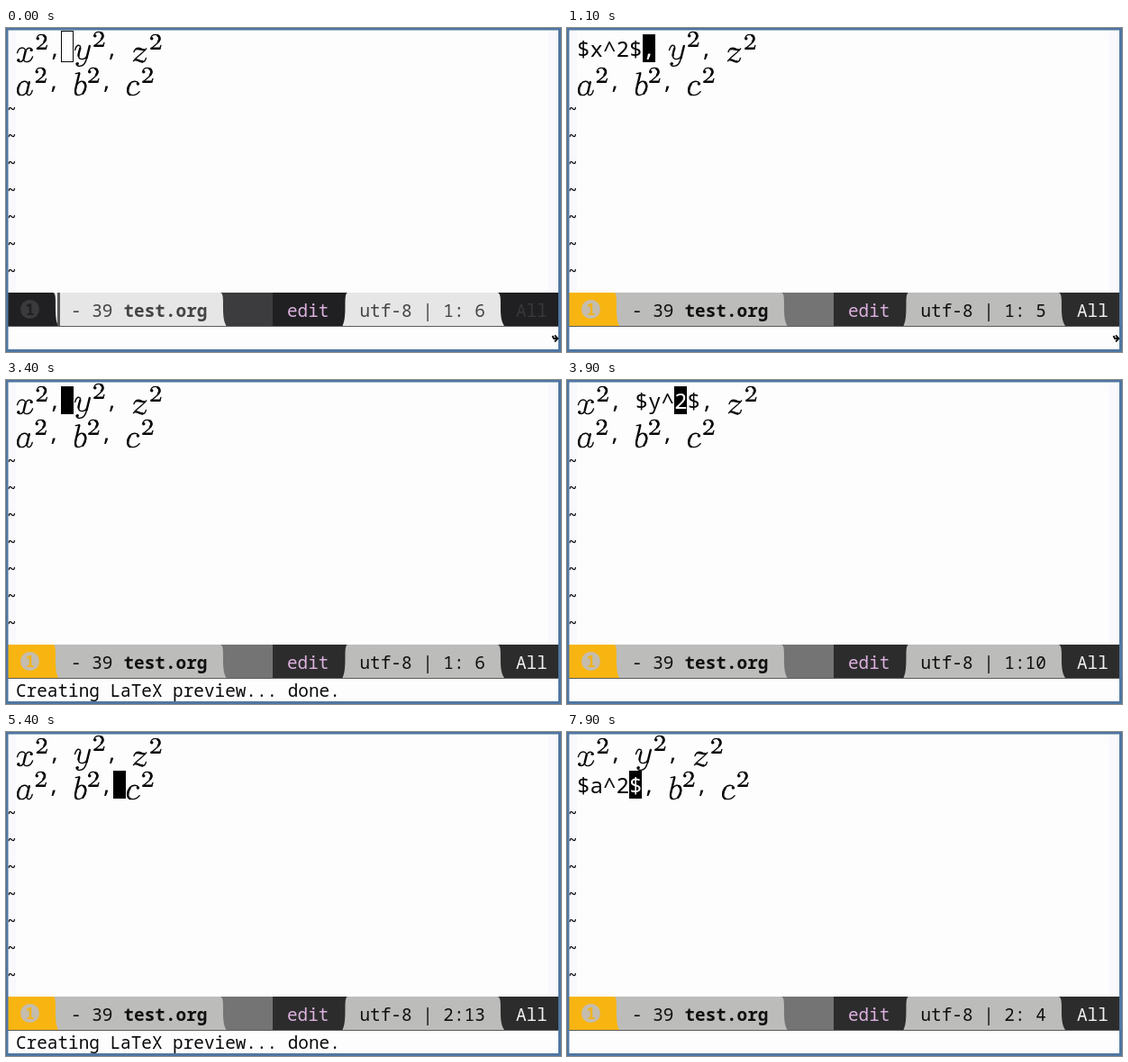
Animation, 616 px wide and 360 px high, one loop 8000 ms. Source, as an HTML page with a canvas:

```html
<!DOCTYPE html>
<html lang="en">
<head>
<meta charset="utf-8">
<title>Formula preview in an editor</title>
<style>
html, body { margin: 0; width: 616px; height: 360px; overflow: hidden; background: #fdfdfd; }
canvas { display: block; }
</style>
</head>
<body>
<canvas id="stage" width="616" height="360"></canvas>
<script>
const ctx = document.getElementById('stage').getContext('2d');
const LOOP = 8000, FOCUS = 500, ARROW_GONE = 2300;
const MONO = '"Noto Sans Mono", "DejaVu Sans Mono", monospace';
const CELL = 14.5, LEFT = 11;
const INK = '#080808', PAPER = '#fdfdfd';

// Math glyphs: preview width, lift, thin strokes, thick strokes, ball ends.
const glyphs = {
  x: {
    w: 35.5,
    thin: 'M1.5-10.5C2.5-14 4.5-16 7-16C9.5-16 11-14 10.5-11.5M8.8-4.5C8-1.5 6.5-.5 4.5-.5C3.2-.5 2.5-1 2.2-1.6' +
      'M10.6-11.5C11.5-14.5 13-15.7 15-15.7C16.3-15.7 17-15.3 17.3-14.6M8.8-4.5C8.3-2 9.5-.4 12-.4C15-.4 17.5-3 18.5-6',
    thick: 'M10.6-12L8.8-4.5',
    balls: [[2.8, -2.2], [17.2, -13.6]]
  },
  y: {
    w: 34.5,
    lift: 3,
    thin: 'M1-10.5C2-14 3.3-15.8 5-15.8C7-15.8 7.4-14 6.8-12M5-4.5C5-1.5 6.5-.4 9-.4C11.5-.4 13.3-2 14.5-4' +
      'M14-1.5C12.8 4 9.8 7.4 6.2 7.4C4 7.4 2.5 6.2 2.6 4.8',
    thick: 'M6.8-12.3C5.8-9 5-6.5 5-4.2M17.3-15L14-1.5',
    balls: [[3.8, 4.6]]
  },
  z: {
    w: 34,
    thin: 'M3-11.5C4-14.5 5.5-15.8 8-15.8C11-15.8 12-13.5 14.5-13.5C15.8-13.5 16.5-14.5 17-15.5C14-10.5 6-6.5 2.2-.8' +
      'C3.5-3.2 5.5-3.2 7.5-2.3C10-1 10.5-.3 12.5-.3C14.5-.3 15.8-2 16.4-4.6',
    thick: 'M6-14.8C9.5-15.5 11-13.4 14.5-13.6M5-2.6C8-2.8 9.5-.6 12.5-.7',
    balls: []
  },
  a: {
    w: 34.5,
    thin: 'M13.5-12.5C13-14.8 11.5-15.8 9.8-15.8C5.5-15.8 1.8-10.8 1.8-5.8C1.8-2.3 3.8-.4 6.5-.4C8.8-.4 11-2.2 12.2-4.2' +
      'M12.3-4C11.8-1.6 12.8-.4 14.3-.4C16.3-.4 17.5-2.6 18.2-5.6',
    thick: 'M4.2-12.4C2.6-9.8 2-7.6 2.2-5C2.3-2.8 3-1.6 4-1M14.8-14.8L12.3-4',
    balls: []
  },
  b: {
    w: 29.5,
    thin: 'M2.8-24.4L7-25M3-8.5C2-4 2.5-.4 6.3-.4C10.5-.4 14.2-5.2 14.2-10.2C14.2-13.8 12.2-15.8 9.8-15.8C7.3-15.8 5.3-13.8 4-11.5',
    thick: 'M6.8-24.5L3-8.5C2.2-5 2.4-2.5 3.5-1.4M11.5-15C13.6-13.6 14-11.5 13.7-9C13.2-6.2 12.2-4 10.8-2.3',
    balls: []
  },
  c: {
    w: 31,
    thin: 'M14.3-13.5C13.5-15 12-15.8 10-15.8C5.5-15.8 1.8-11 1.8-6C1.8-2.5 4-.4 7.5-.4C10.8-.4 13.5-2 15.2-4.3',
    thick: 'M4.8-13C2.7-10 2-7.5 2.2-5C2.4-2.7 3.3-1.5 4.5-.9',
    balls: [[13.4, -12.9]]
  },
  2: {
    thin: 'M1.4-12.2C1.4-14.8 3.5-16.6 6.2-16.6C9.3-16.6 11.6-14.8 11.6-12C11.6-8.6 7-5.8 1.4-.9M11.3-1.3L12.4-4.6',
    thick: 'M8.8-15.6C11.2-14.3 11.4-11 9.4-8.8M2-1.2L11-1.2',
    balls: [[2.3, -12.2]]
  }
};
for (const g of Object.values(glyphs)) {
  g.thin = new Path2D(g.thin);
  g.thick = new Path2D(g.thick);
}

const rows = [
  { letters: 'xyz', mono: 32, math: 38, top: 9 },
  { letters: 'abc', mono: 68, math: 75, top: 45 }
];

// Cursor stops: time, row, column.
const stops = [[0, 1, 6]];
function walk(start, step, row, from, to) {
  const dir = Math.sign(to - from) || 1;
  for (let col = from, t = start; ; col += dir, t += step) {
    stops.push([t, row, col]);
    if (col === to) break;
  }
}
walk(1000, 200, 1, 5, 1);
walk(2000, 200, 1, 2, 6);
walk(3500, 125, 1, 7, 14);
walk(4600, 125, 1, 15, 16);
walk(4850, 125, 2, 16, 13);
walk(5600, 300, 2, 12, 10);
walk(6500, 200, 2, 9, 6);
walk(7500, 250, 2, 5, 4);

// The formula touched by the cursor shows its markup.
function openLetter([, row, col]) {
  return col % 7 <= 5 ? rows[row - 1].letters[Math.floor(col / 7)] : '';
}

function text(str, x, y, size, color, weight = 400) {
  ctx.font = `${weight} ${size}px ${MONO}`;
  ctx.fillStyle = color;
  ctx.fillText(str, x, y);
}

function box(x, y, w, h, color) {
  ctx.fillStyle = color;
  ctx.fillRect(x, y, w, h);
}

function glyph(name, x, y) {
  const g = glyphs[name];
  ctx.save();
  ctx.translate(x, y);
  ctx.strokeStyle = ctx.fillStyle = INK;
  ctx.lineCap = 'round';
  ctx.lineWidth = 1.4;
  ctx.stroke(g.thin);
  ctx.lineWidth = 2.4;
  ctx.stroke(g.thick);
  for (const [bx, by] of g.balls) {
    ctx.beginPath();
    ctx.arc(bx, by, 1.7, 0, 7);
    ctx.fill();
  }
  ctx.restore();
}

function formula(letter, x, y) {
  const { w, lift = 0 } = glyphs[letter];
  glyph(letter, x, y - lift);
  glyph('2', x + w - 13.5, y - lift - 14);
}

function cursor(x, row, ch, focused) {
  if (!focused) {
    ctx.strokeStyle = INK;
    ctx.lineWidth = 1;
    ctx.strokeRect(Math.round(x) + 0.5, row.top - 5.5, 13, 34);
    return;
  }
  box(Math.round(x), row.top - 2, 14, 31, '#000');
  text(ch, x, row.mono, 24.2, '#fff');
}

function drawRow(row, stop, active, focused) {
  const open = active ? openLetter(stop) : '';
  let x = LEFT, col = 0;
  const put = ch => {
    text(ch, x, row.mono, 24.2, INK);
    if (active && col === stop[2]) cursor(x, row, ch, focused);
    x += CELL;
    col++;
  };
  [...row.letters].forEach((letter, i) => {
    if (letter === open) {
      [...`$${letter}^2$`].forEach(put);
    } else {
      formula(letter, x, row.math);
      x += glyphs[letter].w;
      col += 5;
    }
    if (i < 2) [...', '].forEach(put);
  });
}

// Status segment with S-shaped sides; lean moves the foot of each side.
function segment(x0, lean0, x1, lean1, color) {
  const top = 294, foot = 331, low = 319;
  ctx.beginPath();
  ctx.moveTo(x0 - lean0, top);
  ctx.lineTo(x1 - lean1, top);
  ctx.bezierCurveTo(x1 + lean1, top, x1 - lean1, low, x1 + lean1, foot);
  ctx.lineTo(x0 + lean0, foot);
  ctx.bezierCurveTo(x0 - lean0, low, x0 + lean0, top, x0 - lean0, top);
  ctx.fillStyle = color;
  ctx.fill();
}

const activeBar = {
  badge: '#f8b511', disc: '#c4bcae', digit: '#f0b31c', light: '#bcbcbb', gap: '#747474',
  dark: '#2c2c2d', ink: '#101010', edit: '#dcb0de', all: '#f2f2f2'
};
const idleBar = {
  badge: '#202022', disc: '#3a3a3c', digit: '#202022', light: '#e6e6e6', gap: '#3c3c3e',
  dark: '#202022', ink: '#444444', edit: '#dcb0de', all: '#38383a'
};

function statusBar(stop, focused) {
  const c = focused ? activeBar : idleBar;
  box(2, 294, 611, 37, c.dark);
  segment(2, 0, 296, 0, c.gap);
  segment(2, 0, 241, 3.5, c.light);
  segment(2, 0, 55, 3, c.badge);
  segment(376.5, -3, 549, 4, c.light);
  if (!focused) box(57, 294, 3, 37, '#58585a');
  box(2, 331, 611, 1, '#5c5c5c');

  ctx.fillStyle = c.disc;
  ctx.beginPath();
  ctx.arc(26.5, 312.5, 10.5, 0, 7);
  ctx.fill();
  text('1', 21.5, 319, 17, c.digit, 700);

  const size = 19.35, y = 321;
  text('- 39 ', 72, y, size, c.ink);
  text('test.org', 130.5, y, size, c.ink, 700);
  text('edit', 312, y, size, c.edit);
  text(`utf-8 | ${stop[1]}:${String(stop[2]).padStart(2)}`, 392.5, y, size, c.ink);
  text('All', 566, y, size, c.all);
}

function fringeArrow() {
  ctx.strokeStyle = INK;
  ctx.lineCap = 'butt';
  ctx.lineWidth = 1.8;
  ctx.stroke(new Path2D('M606.5 342L608 345H612M609 341.5L612.5 345L609 348.5'));
}

function draw(t) {
  let n = 0;
  while (n + 1 < stops.length && stops[n + 1][0] <= t) n++;
  const stop = stops[n];
  const focused = t >= FOCUS;
  const before = n ? openLetter(stops[n - 1]) : '';

  box(0, 0, 616, 360, PAPER);
  box(2, 2, 9, 292, '#f9f9fd');
  box(602, 2, 11, 292, '#f9f9fd');
  for (let i = 0; i < 7; i++) text('~', 1.5, 96 + 30 * i, 16, INK, 700);

  rows.forEach((row, i) => drawRow(row, stop, stop[1] === i + 1, focused));
  statusBar(stop, focused);

  if (before && before !== openLetter(stop)) {
    text('Creating LaTeX preview... done.', LEFT, 352, 19.35, INK);
  }
  if (t < ARROW_GONE) fringeArrow();

  ctx.strokeStyle = '#4f76a3';
  ctx.lineWidth = 3;
  ctx.strokeRect(1, 1, 613.5, 357.5);
}

const begin = performance.now();
function tick() {
  draw((performance.now() - begin) % LOOP);
  requestAnimationFrame(tick);
}
tick();
</script>
</body>
</html>
```
